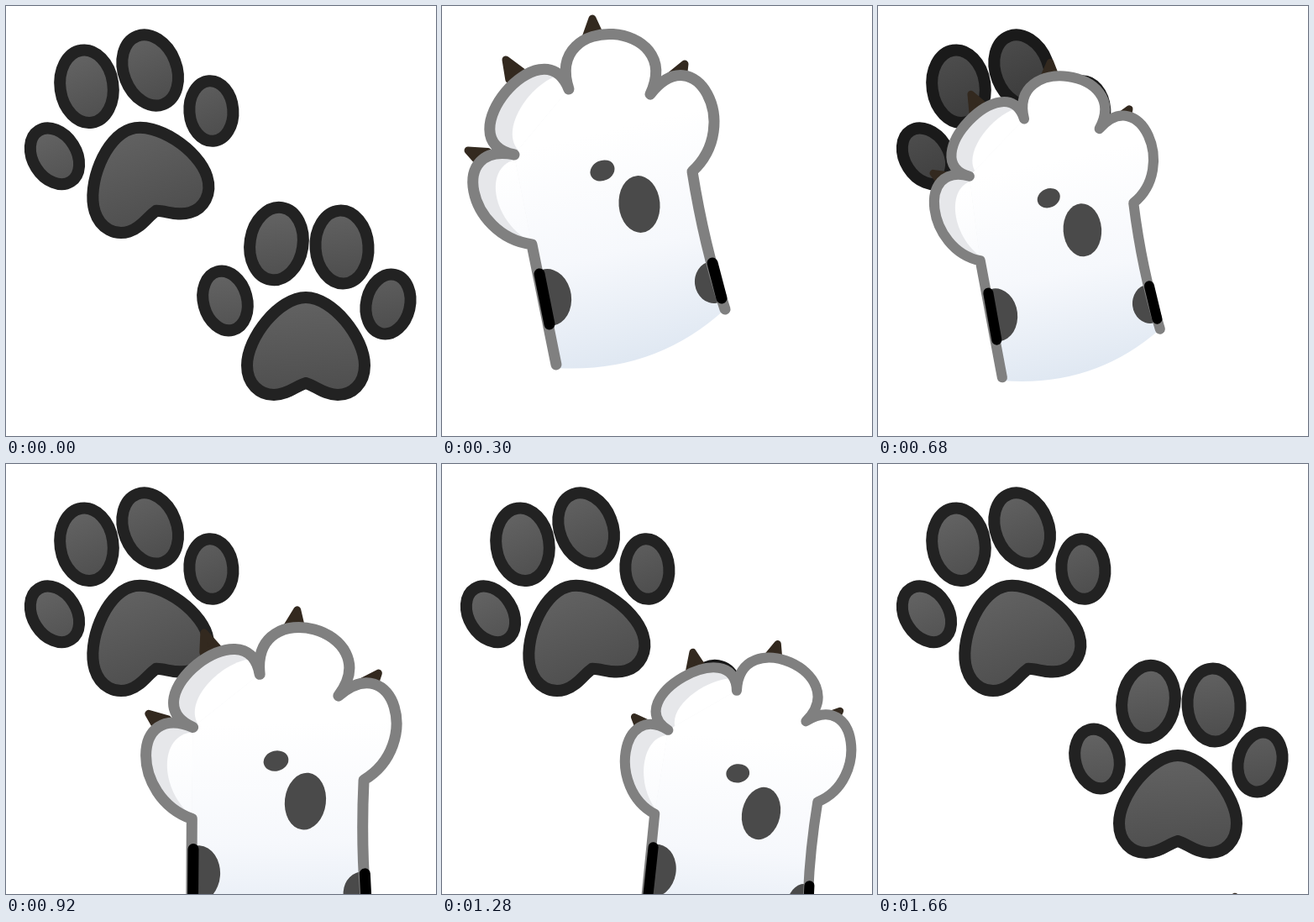
Animation, 512 px wide and 512 px high, one loop 1680 ms. Source, as an HTML page with a canvas:

```html
<!DOCTYPE html>
<html lang="en">
<head>
<meta charset="utf-8">
<title>Paw prints</title>
<style>
  html, body { margin: 0; width: 100%; height: 100%; overflow: hidden; background: #fff; }
  canvas { display: block; width: 100vmin; height: 100vmin; }
</style>
</head>
<body>
<canvas id="stage" width="512" height="512"></canvas>
<script>
const ctx = document.getElementById('stage').getContext('2d');
const LOOP = 1680;
const rad = deg => deg * Math.PI / 180;
const grey = v => `rgb(${v},${v},${v})`;
const mix = (a, b, u) => a + (b - a) * u;
const span = (t, from, to) => Math.max(0, Math.min(1, (t - from) / (to - from)));
const ease = (t, from, to) => {
  const u = span(t, from, to);
  return u * u * (3 - 2 * u);
};

function ink(path, color, width) {
  ctx.strokeStyle = color;
  ctx.lineWidth = width;
  ctx.stroke(path);
}

function oval(x, y, rx, ry, tilt) {
  const path = new Path2D();
  path.ellipse(x, y, rx, ry, rad(tilt), 0, 7);
  return path;
}

// ---- Prints ----

// Toes: x, y, width, tilt around the middle of the print
const PRINT_TOES = [[-98.5, 32, 26, -15], [-37.5, -36, 31.5, 9], [40.5, -32, 31.5, -4], [95.5, 36, 26, 13]];

function padPath() {
  const path = new Path2D();
  for (const side of [-1, 1]) {
    const x = d => side * d - 2.5;
    path.moveTo(x(0), 28);
    path.bezierCurveTo(x(32), 28, x(70), 76, x(70), 109);
    path.bezierCurveTo(x(70), 131, x(55), 144, x(38), 144);
    path.bezierCurveTo(x(22), 144, x(11), 133, x(0), 130);
  }
  return path;
}
const PAD = padPath();

function drawPrint(x, y, turn, light, alpha) {
  ctx.save();
  ctx.globalAlpha = alpha;
  ctx.translate(x, y);
  ctx.rotate(rad(turn));
  const part = (path, top, bottom) => {
    const fill = ctx.createLinearGradient(0, top, 10, bottom);
    fill.addColorStop(0, grey(98 * light));
    fill.addColorStop(1, grey(78 * light));
    ctx.fillStyle = fill;
    ctx.fill(path);
    ink(path, grey(34 * light), 14);
  };
  for (const [tx, ty, r, tilt] of PRINT_TOES) part(oval(tx, ty, r, r * 1.38, tilt), ty - 40, ty + 40);
  part(PAD, 28, 144);
  ctx.restore();
}

// Old prints fade away; a fresh one appears dark under the paw and lightens
function printState(t, stamp) {
  return t < stamp
    ? [1, 1 - span(t, 10, 210)]
    : [mix(.6, 1, span(t, stamp, stamp + 420)), 1];
}

// ---- Paw, measured from its large spot ----

// Wrist, three gaps between the toes, wrist
const KNOTS = [[-128, 48], [-149, -59], [-84, -137], [13, -131], [63, -39]];
// Toe bulges relative to their chord: height, spread at the start, spread at the end
const BULGES = [[.68, -.23, .28], [.73, .4, .4], [.94, .37, .37], [.76, .33, -.19]];
const CLAWS = [[-204, -64], [-159, -172], [-56, -221], [54, -167]];
const SPOTS = [[0, 0, 24.5, 34, -5], [-44, -40, 15, 12, -25], [-108, 111, 27, 34, -8], [88, 93, 22, 25, -8]];
const BARS = ['M-119 83L-107 143', 'M87 70L98 112'].map(d => new Path2D(d));

function pose(t) {
  const rise = 1 - (1 - span(t, 0, 300)) ** 2;
  const settle = ease(t, 300, 500);
  const hop = ease(t, 520, 1040);
  const leave = ease(t, 1340, 1660);
  const arc = 22 * Math.sin(Math.PI * span(t, 520, 1040));
  return {
    x: 300 - 65 * rise - 32 * settle + 177 * hop + 22 * leave,
    y: 752 - 516 * rise - 37 * settle + 217 * hop + arc + 326 * leave,
    turn: 17.5 * ease(t, 600, 1120) + 2.5 * leave,
    press: ease(t, 360, 480) - ease(t, 600, 860) + ease(t, 1140, 1340) - ease(t, 1380, 1600)
  };
}

function twist([x, y], deg) {
  const c = Math.cos(rad(deg)), s = Math.sin(rad(deg));
  return [x * c - y * s, x * s + y * c];
}

// Adds a toe as one curve bulging out from the chord between two knots
function addToe(path, [ax, ay], [bx, by], [height, start, end], size) {
  const dx = (bx - ax) * size, dy = (by - ay) * size;
  path.bezierCurveTo(
    ax + dy * height - dx * start, ay - dx * height - dy * start,
    bx + dy * height + dx * end, by - dx * height + dy * end, bx, by);
}

function drawClaw([x, y], press) {
  const angle = Math.atan2(14 - y, -45 - x);
  ctx.save();
  ctx.translate(x, y);
  ctx.rotate(angle);
  ctx.translate(12 * press, 0);
  const claw = new Path2D('M0 0L22 9V-9Z');
  ctx.fill(claw);
  ink(claw, '#33291f', 9);
  ctx.restore();
}

function drawPaw(t) {
  const { x, y, turn, press } = pose(t);
  const lean = 3.5 * press, size = 1 - .14 * press;
  const knots = KNOTS.map(k => twist(k, lean));

  const side = new Path2D();
  side.moveTo(-99, 191);
  side.lineTo(...knots[0]);
  BULGES.forEach((b, i) => addToe(side, knots[i], knots[i + 1], b, size));
  side.quadraticCurveTo(77, 49, 102, 125);
  const body = new Path2D(side);
  body.quadraticCurveTo(18, 202, -99, 195);

  ctx.save();
  ctx.translate(x, y);
  ctx.rotate(rad(turn));
  ctx.scale(1 - .092 * press, 1 - .092 * press);

  ctx.fillStyle = '#33291f';
  CLAWS.forEach(c => drawClaw(twist(c, lean), press));

  const fill = ctx.createLinearGradient(-45, -86, 20, 194);
  fill.addColorStop(0, '#fff');
  fill.addColorStop(.5, '#f6f8fc');
  fill.addColorStop(1, '#dde6f1');
  ctx.fillStyle = fill;
  ctx.fill(body);

  // Shade the outer side of the first two toes
  for (const i of [0, 1]) {
    const toe = new Path2D();
    toe.moveTo(...knots[i]);
    addToe(toe, knots[i], knots[i + 1], BULGES[i], size);
    ctx.save();
    ctx.clip(toe);
    ctx.fillStyle = '#e6e7ea';
    ctx.fill(toe);
    ctx.translate(27, 6);
    ctx.fillStyle = fill;
    ctx.fill(toe);
    ctx.restore();
  }

  ctx.save();
  ctx.clip(body);
  ctx.fillStyle = '#4a4a4a';
  SPOTS.forEach(s => ctx.fill(oval(...s)));
  ctx.restore();

  ink(side, '#808080', 13);
  BARS.forEach(b => ink(b, '#000', 13));
  ctx.restore();
}

function draw(t) {
  ctx.fillStyle = '#fff';
  ctx.fillRect(0, 0, 512, 512);
  drawPrint(142.5, 119, -17.3, ...printState(t, 500));
  drawPrint(359.5, 319, 0, ...printState(t, 1240));
  drawPaw(t);
}

ctx.lineCap = ctx.lineJoin = 'round';
const start = performance.now();
function frame() {
  draw((performance.now() - start) % LOOP);
  requestAnimationFrame(frame);
}
frame();
</script>
</body>
</html>
```
